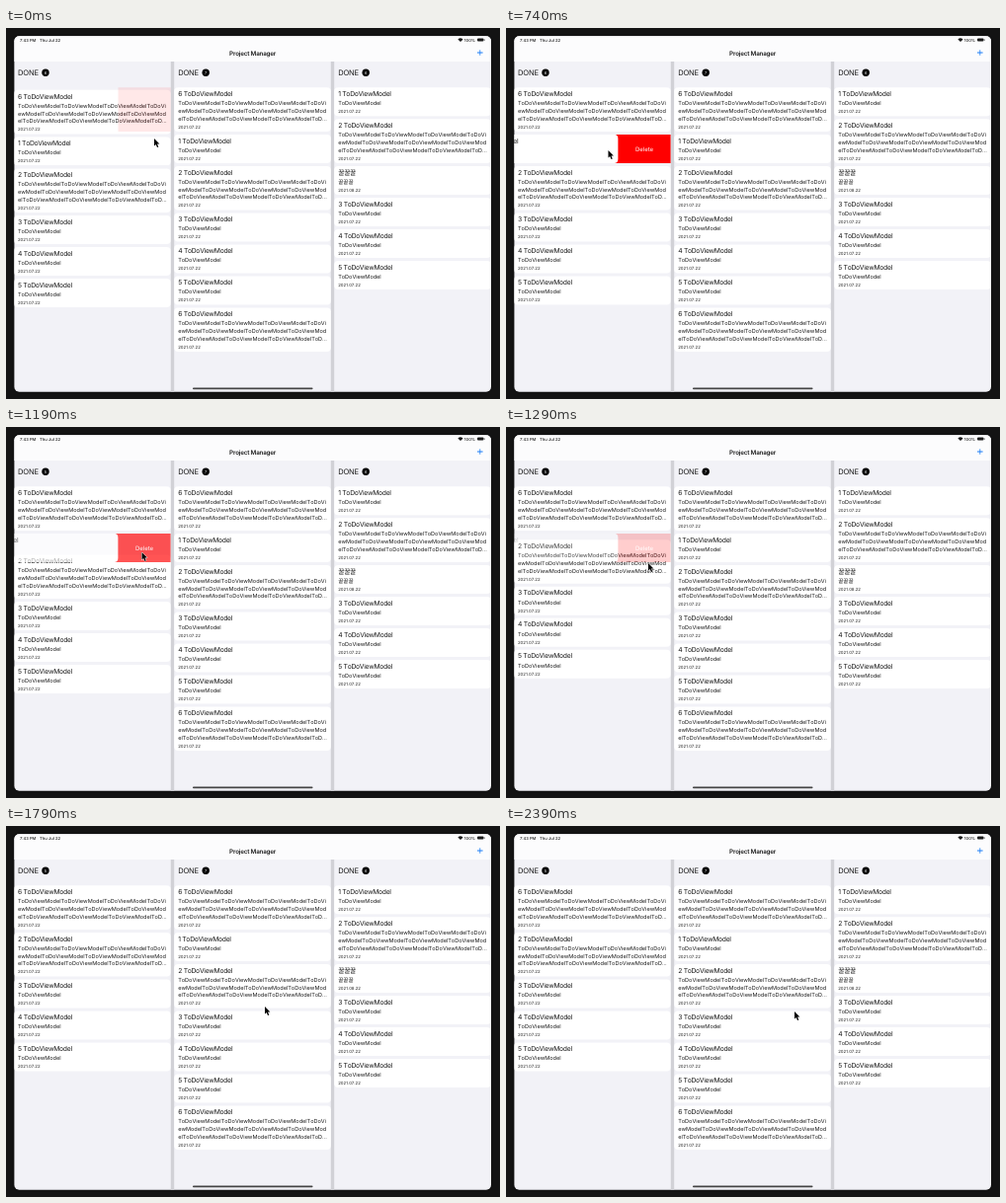
These frames come from a looping animation (500 px wide and 376 px high, 2460 ms). An HTML page with a canvas:

```html
<!DOCTYPE html>
<html>
<head>
<meta charset="utf-8">
<style>
html, body { margin: 0; width: 100%; height: 100%; overflow: hidden; background: #131313; }
canvas { display: block; }
</style>
</head>
<body>
<canvas id="stage" width="500" height="376"></canvas>
<script>
const stage = document.getElementById('stage').getContext('2d');
const layer = new OffscreenCanvas(500, 376).getContext('2d');
let c = stage;
const LOOP = 2460, TOP = 60.3, CARD_W = 158.6;
const INK = '#1c1c1c', GREY = '#f2f2f7';
const WORD = 'ToDoViewModel', LONG = WORD.repeat(11);
const LINES = [LONG.slice(0, 45), LONG.slice(45, 89), LONG.slice(89, 133) + '...'];

// Cards: [title, body lines, date]
const small = n => [n + ' ' + WORD, [WORD], '2021.07.22'];
const large = n => [n + ' ' + WORD, LINES, '2021.07.22'];
const LISTS = [
  [large(6), small(1), large(2), small(3), small(4), small(5)],
  [large(6), small(1), large(2), small(3), small(4), small(5), large(6)],
  [small(1), large(2), ['꿀꿀꿀', ['꿀꿀꿀'], '2021.08.22'], small(3), small(4), small(5)],
];
const COLUMN_X = [8, 170.2, 332.2];

// Keys: [time, value, ...]
const POINTER = [
  [0, 150, 112], [190, 147, 117], [390, 147, 117], [690, 105, 123], [740, 103.5, 124],
  [890, 125, 126], [1040, 137.5, 127], [1190, 137.5, 127], [1290, 144, 138],
  [1390, 164, 164], [1440, 169, 166], [1490, 178, 168], [1790, 262, 183],
  [1990, 269, 191], [2090, 273, 193], [2390, 292, 188],
];
const SWIPE = [[0, 0], [410, 0], [690, 47], [740, 53.2]];
const SETTLE = [[0, 2.5], [40, 1.2], [90, 0.5], [190, 0]];

function at(keys, t) {
  const i = keys.findIndex(k => k[0] > t);
  if (i < 0) return keys[keys.length - 1].slice(1);
  const a = keys[i - 1], b = keys[i], p = (t - a[0]) / (b[0] - a[0]);
  return a.slice(1).map((v, j) => v + (b[j + 1] - v) * p);
}

function text(s, x, y, size, { weight = 400, color = INK, align = 'left', spacing = 0 } = {}) {
  c.font = `${weight} ${size}px Inter, "Noto Sans CJK KR", "Noto Sans CJK", sans-serif`;
  c.textRendering = 'geometricPrecision';
  c.fontKerning = 'none';
  c.letterSpacing = spacing + 'px';
  c.textAlign = align;
  c.fillStyle = color;
  c.fillText(s, x, y);
}

function box(x, y, w, h, color, r = 0) {
  c.fillStyle = color;
  c.beginPath();
  c.roundRect(x, y, w, h, r);
  c.fill();
}

function disc(x, y, r) {
  c.beginPath();
  c.arc(x, y, r, 0, 7);
}

function clipped(x, y, w, h, r, paint) {
  c.save();
  c.beginPath();
  c.roundRect(x, y, w, h, r);
  c.clip();
  paint();
  c.restore();
}

const pitch = card => 32 + (card[1].length - 1) * 7.8;

function drawCard(x, y, card) {
  const [title, body, date] = card, h = pitch(card) - 3;
  box(x, y, CARD_W, h, '#fff', 4);
  text(title, x + 4, y + 8.7, 6.8, { spacing: -0.3 });
  body.forEach((line, i) => text(line, x + 4, y + 17.9 + i * 7.8, 5.58, { spacing: -0.02 }));
  text(date, x + 4, y + h - 3.2, 4.3);
}

function drawSwiped(x, y, card, shift, alpha) {
  const h = pitch(card) - 3, edge = x + CARD_W - shift;
  // Painted apart so that the row fades as one piece
  c = layer;
  c.clearRect(0, 0, 500, 376);
  clipped(x, y, CARD_W, h, 0, () => {
    if (shift > 0) {
      box(edge - 4, y, shift + 4, h, '#f00');
      text('Delete', edge + shift / 2, y + 16.8, 6, { color: '#fff', align: 'center' });
    }
    drawCard(x - shift, y, card);
  });
  c = stage;
  c.globalAlpha = alpha;
  c.drawImage(layer.canvas, 0, 0);
  c.globalAlpha = 1;
}

function drawHeader(x, count) {
  text('DONE', x + 4, 48.2, 7.6, { spacing: -0.2 });
  c.fillStyle = '#000';
  disc(x + 32, 45.2, 3.7);
  c.fill();
  text(count, x + 32, 46.6, 4, { color: '#fff', align: 'center' });
}

function drawStatus() {
  text('7:43 PM', 14, 13.8, 4.1, { weight: 500 });
  text('Thu Jul 22', 34, 13.8, 4.2, { weight: 500 });
  text('100%', 463.8, 13.8, 4.1, { weight: 500 });
  c.fillStyle = INK;
  c.beginPath();
  c.moveTo(460, 14);
  c.arc(460, 14, 3.6, -Math.PI * 0.76, -Math.PI * 0.24);
  c.fill();
  box(477, 10.6, 6.5, 3, INK, 1);
  box(483.9, 11.5, 0.6, 1.2, INK);
  text('Project Manager', 249.6, 27.5, 6.3, { weight: 600, align: 'center', spacing: -0.22 });
  box(477, 24.6, 5.6, 0.8, '#1a7cf5');
  box(479.4, 22.2, 0.8, 5.6, '#1a7cf5');
}

function drawFirstColumn(t) {
  const x = COLUMN_X[0], list = LISTS[0];
  const p = Math.min(1, Math.max(0, (t - 1075) / 300));
  const gone = p * p * (3 - 2 * p);
  const [settle] = at(SETTLE, t), [shift] = at(SWIPE, t);
  let y = TOP + settle, slot;
  list.forEach((card, i) => {
    if (i === 1) {
      slot = y;
      y += pitch(card) * (1 - gone);
    } else {
      drawCard(x, y, card);
      y += pitch(card);
    }
  });
  if (gone < 1) drawSwiped(x, slot, list[1], shift, 1 - gone);
  // Fading rest of the row removed before
  if (settle > 0) box(113.5, TOP, 53.2, 44.6, `rgba(255,0,0,${settle * 0.036})`);
}

function drawPointer(t) {
  const [x, y] = at(POINTER, t);
  if ((t >= 390 && t < 720) || (t >= 1040 && t < 1090)) {
    c.strokeStyle = '#222';
    c.lineWidth = 1.1;
    disc(x - 0.5, y, 13);
    c.stroke();
  }
  c.save();
  c.translate(x, y);
  c.beginPath();
  [[0, 0], [0, 7.6], [1.7, 6.1], [3, 9], [4.3, 8.4], [3, 5.6], [5.4, 5.5]].forEach(q => c.lineTo(...q));
  c.closePath();
  c.strokeStyle = '#fff';
  c.lineWidth = 1;
  c.stroke();
  c.fillStyle = '#000';
  c.fill();
  c.restore();
}

function draw(t) {
  box(0, 0, 500, 376, '#131313');
  clipped(8.4, 8.3, 482.6, 360.4, 5, () => {
    box(8, 8, 484, 361, GREY);
    box(8, 8, 484, 26, '#fcfcfd');
    box(166.8, 34, 3.4, 335, '#d1d1d6');
    box(328.8, 34, 3.4, 335, '#d1d1d6');
    drawStatus();
    COLUMN_X.forEach((x, i) => drawHeader(x, i === 1 ? 7 : i === 0 && t >= 1090 ? 5 : 6));
    drawFirstColumn(t);
    [1, 2].forEach(i => {
      let y = TOP;
      for (const card of LISTS[i]) {
        drawCard(COLUMN_X[i], y, card);
        y += pitch(card);
      }
    });
    box(189, 364.6, 121.5, 1.6, '#444', 0.8);
  });
  drawPointer(t);
}

const start = performance.now();
function tick() {
  const t = (performance.now() - start) % LOOP;
  // The picture advances in 50 ms steps after a first one of 40 ms
  draw(t < 40 ? 0 : Math.min(2390, 40 + Math.floor((t - 40) / 50) * 50));
  requestAnimationFrame(tick);
}
tick();
</script>
</body>
</html>
```
